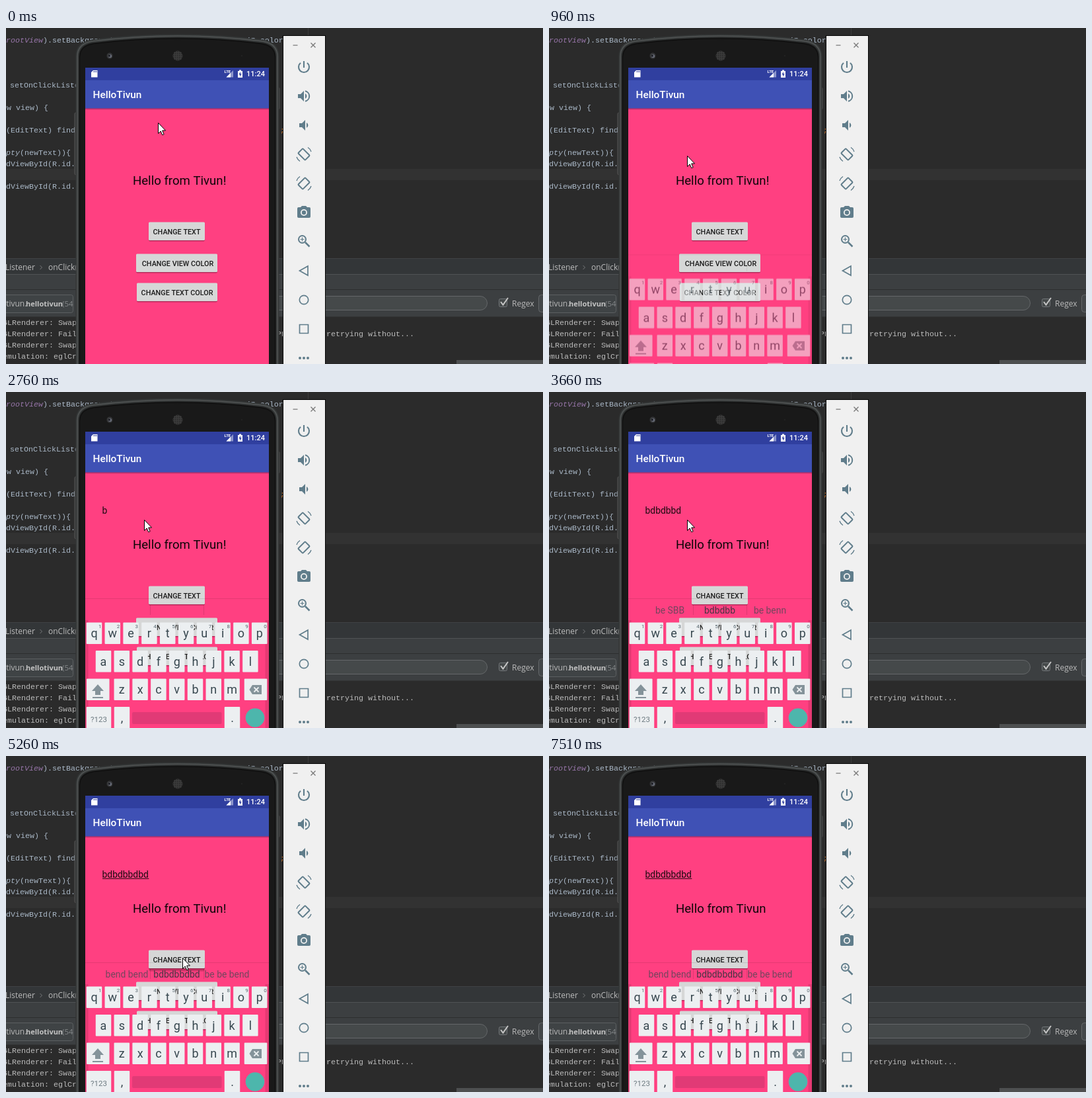
An HTML page with a canvas that plays this animation: 813 by 508 pixels, repeating every 8000 ms.

```html
<!DOCTYPE html>
<html lang="en">
<head>
<meta charset="utf-8">
<title>Phone emulator</title>
<style>
html, body { margin: 0; width: 100%; height: 100%; overflow: hidden; background: #2b2b2b; }
canvas { display: block; }
</style>
</head>
<body>
<canvas id="stage" width="813" height="508"></canvas>
<script>
const W = 813, H = 508, LOOP = 8000;
const screenCtx = document.getElementById('stage').getContext('2d');
const layer = document.createElement('canvas');
layer.width = W;
layer.height = H;
const layerCtx = layer.getContext('2d');
let c = screenCtx;

const MONO = '11.67px "Liberation Mono", monospace';
const UI = '"Open Sans", sans-serif';
const DROID = 'Roboto, sans-serif';
const PINK = '#ff4081', SLATE = '#607d8b', CODE = '#a9b7c6';

// Each track lists [start time, value]; a value holds until the next one.
const cursorTrack = [
  [0, [230, 143]], [150, [215, 174]], [280, [209, 193]], [4430, [220, 232]],
  [4580, [241, 276]], [4710, [259, 296]], [4860, [267, 305]], [6190, [268, 305]],
  [6310, [310, 297]], [6430, [344, 282]], [6580, [359, 266]], [7390, [225, 489]], [7510, null]
];
const typed = 'bdbdbbdbd';
const typedTrack = [[0, 0], [2760, 1], [2880, 2], [3150, 3], [3280, 4], [3400, 5],
  [3520, 6], [3660, 7], [3780, 8], [3900, 9]];
const hintTrack = [
  [0, []], [3000, ['Bd', 'bd', 'be']], [3150, ['be', 'bdb', 'bed']], [3280, ['be', 'bdbd', 'bend']],
  [3520, ['be SBB', 'bdbdbb', 'be benn']], [3900, ['be bend', 'bdbdbbd', 'be be be']],
  [4050, ['bend bend', typed, 'be be bend']]
];
const greeting = 'Hello from Tivun';
const labelTrack = [[0, greeting + '!'], [5530, typed], [7110, greeting]];

function at(track, t) {
  let value = track[0][1];
  for (const [start, v] of track) if (t >= start) value = v;
  return value;
}

function rect(x, y, w, h, color) {
  c.fillStyle = color;
  c.fillRect(x, y, w, h);
}

function round(x, y, w, h, r, fill, stroke) {
  c.beginPath();
  c.roundRect(x, y, w, h, r);
  if (fill) { c.fillStyle = fill; c.fill(); }
  if (stroke) { c.strokeStyle = stroke; c.lineWidth = 1; c.stroke(); }
}

function disc(x, y, r, color) {
  c.beginPath();
  c.arc(x, y, r, 0, 7);
  c.fillStyle = color;
  c.fill();
}

function text(str, x, y, font, color, align = 'left') {
  c.font = font;
  c.fillStyle = color;
  c.textAlign = align;
  c.fillText(str, x, y);
}

function shape(d, color, width) {
  const p = new Path2D(d);
  if (width) {
    c.strokeStyle = color;
    c.lineWidth = width;
    c.stroke(p);
  } else {
    c.fillStyle = color;
    c.fill(p);
  }
}

function drawEditor() {
  rect(0, 0, W, H, '#2b2b2b');
  rect(0, 213, W, 17, '#323232');
  rect(457, 0, 1, 349, '#3c3c3c');

  const code = (s, x, y, color = CODE, style = '') => text(s, x, y, style + MONO, color);
  code('rootView', 0, 22, '#9876aa', 'italic ');
  code(').setBackgroundColor(getResources().getColor(R.color.', 56, 22);
  code('setOnClickListener(', 6, 90);
  code('ew view) {', -6, 124);
  code('(EditText) findViewById', 0, 158);
  code(';', 415, 158, '#cc7832');
  code('pty', 0, 192, CODE, 'italic ');
  code('(newText)){', 21, 192);
  for (const y of [209, 243]) {
    code('dViewById(R.id.', 0, y);
    code('t', 105, y, '#9876aa', 'italic ');
  }

  rect(0, 349, W, 24, '#333638');
  rect(0, 373, W, 64, '#3c3f41');
  rect(0, 348, W, 1, '#3f4244');
  rect(0, 372, W, 1, '#505355');
  rect(0, 395, W, 1, '#2c2e2f');
  rect(0, 436, W, 1, '#323435');
  text('Listener', -1, 366, '12px ' + UI, '#bbbbbb');
  shape('M51.5 359 L54.5 362 L51.5 365', '#77797a', 1);
  text('onClick()', 64, 366, '12px ' + UI, '#bbbbbb');

  round(-5.5, 403.5, 107, 27, 3, '#3f4345', '#5c5f61');
  text('.tivun.', -3, 421, '12px ' + UI, '#bbbbbb');
  text('hellotivun', 30, 421, 'bold 11px ' + UI, '#c4c4c4');
  text('(5412)', 85, 421, '11.5px ' + UI, '#85888a');
  rect(102, 400, 10, 34, '#3c3f41');
  round(300.5, 405.5, 428, 21, 10.5, '#45494a', '#646769');
  round(746.5, 409.5, 12, 12, 2, '#45494a', '#73777a');
  shape('M749 414 L752.5 418.5 L760 408', '#c6c6c6', 2);
  text('Regex', 766, 421, '12px ' + UI, '#bbbbbb');
  round(806.5, 403.5, 20, 26, 4, '#43474a', '#646769');

  rect(0, 437, W, 71, '#2b2b2b');
  const log = (s, y, x = -5) => text(s, x, y, MONO, '#bbbbbb');
  log('GLRenderer: Swap', 449);
  log('GLRenderer: Failed to', 466);
  log('PF', 466, 410);
  log('retrying without...', 466, 485);
  log('GLRenderer: Swap', 483);
  log('emulation: eglCreate', 500);
  rect(682, 502, 131, 6, '#4d4f50');
}

function drawPhone() {
  round(104, 128, 5, 94, 2, '#3b3c3c', '#555');
  round(409, 90, 5, 33, 2, '#3b3c3c', '#555');
  const body = 'M108 512V43Q108 24 130 20Q259.500 4 389 20Q411 24 411 43V512Z';
  shape(body, '#191919');
  shape(body, '#343737', 5);
  shape(body, '#515454', 1.5);
  shape('M111.5 512V44Q112 27 132 24Q259.500 8 387 24Q407 27 407.500 44V512', '#0d0d0d', 1);
  disc(157, 42, 4.5, '#363739');
  disc(157.5, 42.5, 2.5, '#6b6f7c');
  disc(156.5, 42, 1.5, '#16171d');
  disc(260, 42, 7.5, '#3d3d3d');
  for (let y = -6; y <= 6; y += 3)
    for (let x = -6; x <= 6; x += 3)
      if (x * x + y * y < 46) disc(260 + x, 42 + y, 0.8, '#171717');
  disc(357, 42, 1, '#242424');
}

function drawButton(label, x, y, w, center, raised) {
  round(x, y + 1, w, 28, 2, 'rgba(90,20,45,.45)');
  if (raised) round(x + 0.5, y + 2, w - 1, 30, 2, 'rgba(90,20,45,.3)');
  round(x, y, w, 27.500, 1.5, '#d6d7d7');
  text(label, center, y + 18.500, '500 10.8px ' + DROID, '#1b1b1b', 'center');
}

function drawStatusBar() {
  rect(120, 60, 278, 19, '#303f9f');
  shape('M132 64H138.500V74.500H129V67Z', '#fff');
  for (const x of [132.5, 134.5, 136.5]) rect(x, 65, 1, 2, '#303f9f');
  text('LTE', 330.5, 68, 'bold 6px ' + DROID, '#fff');
  shape('M344 64V74.500H333.500Z', '#8c95cb');
  shape('M340 68V74.500H333.500Z', '#fff');
  shape('M351 65H353V63.500H356V65H358V75H351Z', '#fff');
  shape('M355 66L352.500 70.500H354.200V74L356.700 69.300H355Z', '#303f9f');
  text('11:24', 392, 73, '500 11px ' + DROID, '#fff', 'right');
}

function drawApp(t) {
  rect(120, 60, 278, 448, PINK);
  drawStatusBar();
  rect(120, 79, 278, 42.500, '#3f51b5');
  rect(120, 121.500, 278, 1, 'rgba(60,20,70,.5)');
  rect(120, 122.500, 278, 1, 'rgba(60,20,70,.2)');
  text('HelloTivun', 131.5, 106, '500 15.4px ' + DROID, '#fff');

  const entry = typed.slice(0, at(typedTrack, t));
  const underlined = t >= 4050 || (t >= 3150 && t < 3280);
  text(entry, 145.5, 183.500, '13.9px ' + DROID, '#1c0a10');
  if (underlined) rect(146, 185, c.measureText(entry).width, 1, '#2c0c17');
  text(at(labelTrack, t), 192, 237, '18.6px ' + DROID, '#0d0507');

  drawButton('CHANGE TEXT', 216, 293.500, 85, 258.5, t >= 5260 && t < 5530);
  drawButton('CHANGE VIEW COLOR', 197, 341.500, 123, 260, false);
  drawButton('CHANGE TEXT COLOR', 198, 385.500, 122, 259, false);
}

function drawKey(label, center, y, w = 23.500, size = 18) {
  round(center - w / 2, y, w, 32.500, 1, '#eceff1');
  text(label, center, y + 22.500, size + 'px ' + DROID, size < 14 ? '#6d7a81' : '#37474f', 'center');
}

function drawKeyboard(t) {
  rect(120, 312, 278, 1, 'rgba(0,0,0,.1)');
  for (const x of [218, 299]) rect(x, 322, 1, 15, 'rgba(0,0,0,.12)');
  rect(120, 345, 4.500, 163, 'rgba(0,0,0,.1)');
  rect(392.500, 345, 5.500, 163, 'rgba(0,0,0,.1)');

  at(hintTrack, t).forEach((s, i) =>
    text(s, [183, 258.5, 334.5][i], 335, '13.9px ' + DROID,
      i === 1 ? 'rgba(38,50,56,.85)' : 'rgba(55,71,79,.7)', 'center'));

  const row = (letters, x, y) => [...letters].forEach((s, i) => drawKey(s, x + i * 27.8, y));
  row('qwertyuiop', 133.5, 348.500);
  for (let i = 0; i < 10; i++)
    text((i + 1) % 10, 142.2 + i * 27.8, 356.500, '8px ' + DROID, '#56656d', 'center');
  row('asdfghjkl', 147.5, 391);
  row('zxcvbnm', 175.300, 433.500);
  drawKey('', 139.3, 433.500, 34.500);
  shape('M139 442L148 452H143V458H135V452H130ZM131 461H147V463H131Z', '#84939a');
  drawKey('', 378, 433.500, 34.500);
  shape('M373 443H387V457H373L368.500 450Z', '#84939a');
  shape('M375.500 446.500L382.500 453.500M382.500 446.500L375.500 453.500', '#eceff1', 1.8);
  drawKey('?123', 140.500, 476, 37.500, 11.5);
  drawKey(',', 175.500, 476);
  round(191, 484, 135.500, 18, 2, 'rgba(55,30,60,.15)');
  drawKey('.', 342.500, 476);
  disc(377, 492.500, 14.300, '#4db6ac');
}

// The keyboard is composed on its own layer so that it fades as a whole.
function showKeyboard(t) {
  if (t < 960) return;
  const entering = t < 1090;
  c = layerCtx;
  c.clearRect(0, 0, W, H);
  drawKeyboard(t);
  c = screenCtx;
  c.save();
  c.beginPath();
  c.rect(120, 60, 278, 448);
  c.clip();
  c.globalAlpha = entering ? 0.55 : 1;
  c.drawImage(layer, 0, entering ? 30.5 : 0);
  c.restore();
}

function icon(y, draw) {
  c.save();
  c.translate(451, y);
  draw();
  c.restore();
}

function rotateIcon(y, flip) {
  icon(y, () => {
    c.scale(flip, 1);
    shape('M6 -10.500A12 12 0 0 1 11 -4M-6 10.500A12 12 0 0 1 -11 4', SLATE, 1.4);
    c.rotate(Math.PI / 4);
    c.strokeStyle = SLATE;
    c.lineWidth = 2;
    c.beginPath();
    c.roundRect(-7.5, -5, 15, 10, 1);
    c.stroke();
  });
}

function drawPanel() {
  rect(419, 11, 65, 497, '#050505');
  rect(420, 12, 63, 496, '#f0f0f0');
  rect(434.500, 25.500, 7, 1.2, '#777');
  shape('M461.500 22.500L468.500 29.500M468.500 22.500L461.500 29.500', '#777', 1.3);

  const speaker = 'M-9 -3H-5L0 -8V8L-5 3H-9Z';
  icon(59, () => shape('M0 -9V1M-5 -6.200A8 8 0 1 0 5 -6.200', SLATE, 2.1));
  icon(103, () => {
    shape(speaker, SLATE);
    shape('M2 -4A4.500 4.500 0 0 1 2 4Z', SLATE);
    shape('M2 -7.800A8 8 0 0 1 2 7.800', SLATE, 2);
  });
  icon(147, () => {
    c.translate(2, 0);
    shape(speaker, SLATE);
    shape('M2 -4A4.500 4.500 0 0 1 2 4Z', SLATE);
  });
  rotateIcon(191, 1);
  rotateIcon(235, -1);
  icon(279, () => {
    round(-10, -8, 20, 16, 2, SLATE);
    shape('M-5 -8L-3 -10H3L5 -8Z', SLATE);
    disc(0, 0, 5, '#f0f0f0');
    disc(0, 0, 3.2, SLATE);
  });
  icon(322, () => {
    shape('M-8 -2.500A5.500 5.500 0 1 1 3 -2.500A5.500 5.500 0 1 1 -8 -2.500', SLATE, 2);
    shape('M2 2L8.500 8.500', SLATE, 2.500);
    shape('M-5.500 -2.500H0.500M-2.500 -5.500V0.500', SLATE, 1.2);
  });
  icon(367, () => shape('M6 -7V7L-6.500 0Z', SLATE, 1.7));
  icon(411, () => shape('M-6.700 0A6.700 6.700 0 1 1 6.700 0A6.700 6.700 0 1 1 -6.700 0', SLATE, 1.7));
  icon(455, () => shape('M-6.500 -6.500H6.500V6.500H-6.500Z', SLATE, 1.7));
  for (const x of [445, 451, 457]) disc(x, 499, 2, SLATE);
}

function drawCursor(t) {
  const spot = at(cursorTrack, t);
  if (!spot) return;
  c.save();
  c.translate(spot[0] + 0.5, spot[1] + 0.5);
  const arrow = 'M0 0V16L3.700 12.500L6.200 18.200L8.600 17.200L6.200 11.500H11Z';
  shape(arrow, '#fff');
  shape(arrow, '#000', 1);
  c.restore();
}

function frame(now) {
  const t = now % LOOP;
  drawEditor();
  drawPhone();
  drawApp(t);
  showKeyboard(t);
  drawPanel();
  drawCursor(t);
  requestAnimationFrame(frame);
}
frame(performance.now());
</script>
</body>
</html>
```
